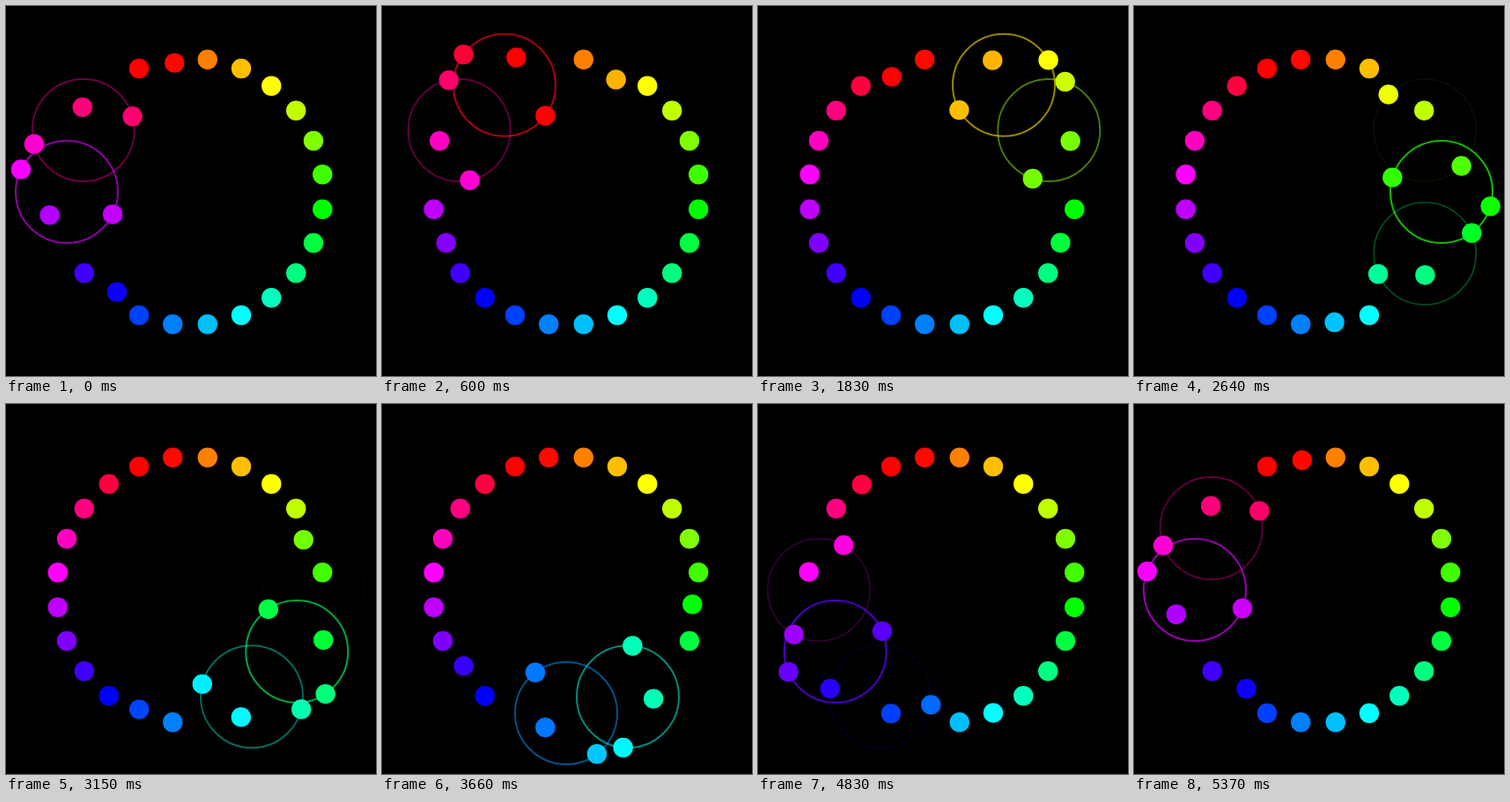
An HTML page with a canvas that plays this animation: 420x420 px, repeating every 5.4 s.

```html
<!DOCTYPE html>
<html lang="en">
<head>
<meta charset="utf-8">
<title>Rainbow ring of turning pairs</title>
<style>
  html, body { margin: 0; width: 100%; height: 100%; overflow: hidden; background: #000; }
  canvas { display: block; width: 420px; height: 420px; }
</style>
</head>
<body>
<canvas id="stage" width="420" height="420"></canvas>
<script>
const ctx = document.getElementById('stage').getContext('2d');

const LOOP = 5400, TICK = 30;
const PAIRS = 12, STAGGER = LOOP / PAIRS;
const TURN = 2160, LEAD = 339;
const CX = 209, CY = 211;
const ORBIT = 140, RADIUS = 58, DOT = 11.2;
const HUE_SHIFT = 112.5, HUE_SPREAD = 22.5;

const rad = deg => deg * Math.PI / 180;
const mod = (a, n) => ((a % n) + n) % n;
const ease = u => u - Math.sin(2 * Math.PI * u) / (2 * Math.PI);

// Oranges lean towards red below 30 degrees.
function colour(hue, alpha = 1) {
  let h = mod(hue, 360);
  if (h < 30) h = h ** 4 / 27000;
  return `hsla(${h}, 100%, 50%, ${alpha})`;
}

function pairAt(i, time) {
  const angle = 240 + 30 * i;
  const u = Math.min(1, mod(time + LEAD - STAGGER * i, LOOP) / TURN);
  return {
    x: CX + ORBIT * Math.cos(rad(angle)),
    y: CY + ORBIT * Math.sin(rad(angle)),
    angle,
    turn: ease(u),
    speed: Math.sin(Math.PI * u) ** 2,
    hue: angle + HUE_SHIFT
  };
}

function drawRing(p) {
  if (p.speed < 0.3) return;
  ctx.beginPath();
  ctx.arc(p.x, p.y, RADIUS, 0, 2 * Math.PI);
  ctx.lineWidth = 2.2 * p.speed;
  ctx.strokeStyle = colour(p.hue, 0.75 * p.speed ** 3);
  ctx.stroke();
}

// The two dots trade places and hues in half a turn.
function drawDots(p) {
  for (const side of [-1, 1]) {
    const a = rad(p.angle + 90 * side + 180 * p.turn);
    ctx.beginPath();
    ctx.arc(p.x + RADIUS * Math.cos(a), p.y + RADIUS * Math.sin(a), DOT, 0, 2 * Math.PI);
    ctx.fillStyle = colour(p.hue + side * HUE_SPREAD * (1 - 2 * p.turn));
    ctx.fill();
  }
}

function draw(time) {
  ctx.fillStyle = '#000';
  ctx.fillRect(0, 0, 420, 420);
  const pairs = Array.from({ length: PAIRS }, (_, i) => pairAt(i, time));
  pairs.forEach(drawRing);
  pairs.forEach(drawDots);
}

const start = performance.now();
function frame() {
  const t = mod(performance.now() - start, LOOP);
  draw(Math.floor(t / TICK) * TICK);
  requestAnimationFrame(frame);
}
frame();
</script>
</body>
</html>
```
